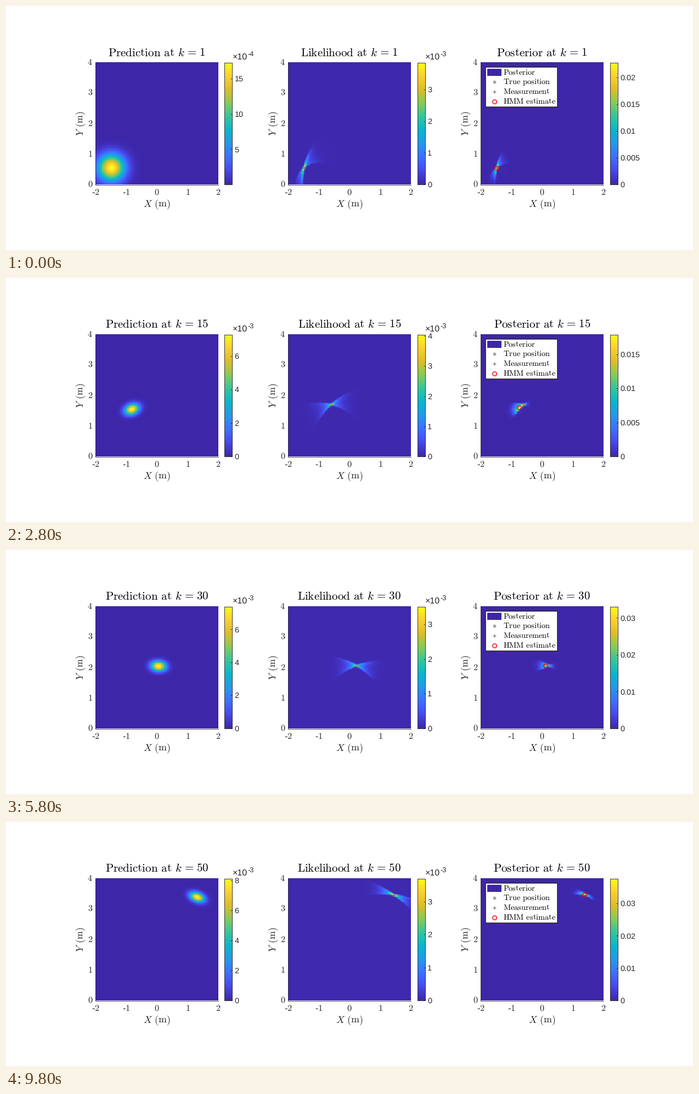
Write a matplotlib script that moves like this. It is 1252 px wide and 447 px high and loops after 10 s.

```python
import numpy as np
import matplotlib.pyplot as plt
from matplotlib.animation import FuncAnimation
from matplotlib.colors import LinearSegmentedColormap
from matplotlib.patches import Rectangle

W, H, DPI = 1252, 447, 64
PT = 72 / DPI  # points per pixel
STEPS, INTERVAL = 50, 200
LEFTS, TOP, SIDE = (163, 514, 865), 103.5, 224
BOTTOM = TOP + SIDE
INK = "0.15"

plt.rcParams.update({
    "mathtext.fontset": "cm",
    "text.hinting": "none",
    "toolbar": "None",
})

parula = LinearSegmentedColormap.from_list("parula", [
    "#3e26a8", "#4747eb", "#3e6fff", "#2797eb", "#08b5d0",
    "#31c69f", "#81cc59", "#dcbd29", "#fccf30", "#f9fb15"])

# Tracking model, in metres
CELLS = 133
START_SIGMA, STEP_SIGMA, FAN_SIGMA = .3, .095, .26
RIDGE, REACH, FLOOR = .02, .38, .011
sensors = np.sin(np.linspace(-1.2, 1.2, 17)) / np.sin(1.2)
centres = (np.arange(CELLS) + .5) * 4 / CELLS
gx, gy = np.meshgrid(centres - 2, centres)
speckle = np.random.default_rng(4).uniform(.8, 1.1, gx.shape)


def true_position(step):
    u = step / (STEPS - 1)
    wave = np.sin(2 * np.pi * u)
    x = -1.48 + 2.92 * u + .06 * wave * (1 - .6 * u)
    y = .55 + 2.91 * u + .3 * wave - .055 * np.sin(4 * np.pi * u)
    return np.array([x, y])


def normalised(field):
    return field / field.sum()


def gaussian(mean, cov):
    u, v = gx - mean[0], gy - mean[1]
    (a, b), (_, c) = np.linalg.inv(cov)
    return normalised(np.exp(-.5 * (a * u * u + 2 * b * u * v + c * v * v)))


def range_fan(p):
    """Range arcs of all sensors crossing at one point."""
    fan = np.mean([np.exp(-.5 * ((np.hypot(gx - s, gy) - np.hypot(p[0] - s, p[1]))
                                 / RIDGE)**2) for s in sensors], axis=0)
    window = np.exp(-((gx - p[0])**2 + (gy - p[1])**2) / (2 * REACH**2))
    return normalised(fan**.9 * window * speckle + FLOOR)


def fan_covariance(p):
    away = np.column_stack([p[0] - sensors, np.full(len(sensors), p[1])])
    away /= np.linalg.norm(away, axis=1)[:, None]
    tangents = away[:, ::-1] * (-1, 1)
    return FAN_SIGMA**2 * tangents.T @ tangents / len(sensors) + 1e-4 * np.eye(2)


def track():
    """Random-walk filter: true position, prediction and estimate at each step."""
    mean, cov = true_position(0), START_SIGMA**2 * np.eye(2)
    history = []
    for step in range(STEPS):
        truth = true_position(step)
        gain = cov @ np.linalg.inv(cov + fan_covariance(truth))
        estimate = mean + gain @ (truth - mean)
        history.append((truth, mean, cov, estimate))
        mean = estimate
        cov = (np.eye(2) - gain) @ cov + STEP_SIGMA**2 * np.eye(2)
    return history


def tex(words):
    return r"\hspace{0.38}".join(r"\mathrm{%s}" % w for w in words.split())


def to_pixels(left, point):
    return left + (point[0] + 2) * SIDE / 4, BOTTOM - point[1] * SIDE / 4


fig = plt.figure(figsize=(W / DPI, H / DPI), dpi=DPI, facecolor="white")
ax = fig.add_axes([0, 0, 1, 1])
ax.set(xlim=(0, W), ylim=(H, 0))
ax.axis("off")
ax.autoscale(False)


def text(x, y, s, size, ha="center", color=INK, **kw):
    return ax.text(x, y, s, fontsize=size * PT, ha=ha, va="baseline", color=color, **kw)


def picture(data, left, right, top, bottom):
    return ax.imshow(data, cmap=parula, vmin=0, vmax=1, origin="lower", aspect="auto",
                     interpolation="nearest", extent=(left, right, bottom, top))


def marker(x, y, shape, size, color, width=1., zorder=4, **kw):
    return ax.plot([x], [y], shape, ms=size * PT, mec=color, mew=width * PT,
                   zorder=zorder, **kw)[0]


def frame_panel(left):
    ax.plot([left, left, left + SIDE], [TOP, BOTTOM, BOTTOM], color=INK, lw=.8 * PT)
    for i in range(5):
        text(left - 5, BOTTOM - i * SIDE / 4 + 4, rf"$\mathrm{{{i}}}$", 16.2, "right")
        x = left + i * SIDE / 4
        value = i - 2
        if value < 0:
            text(x - 4, 346.5, "-", 16.2, family="Liberation Serif")
        text(x + (2.7 if value < 0 else 0), 346.5, rf"$\mathrm{{{abs(value)}}}$", 16.2)
    text(left + SIDE / 2, 367.5, rf"$X\hspace{{0.38}}{tex('(m)')}$", 18)
    text(left - 22.5, 215.5, rf"$Y\hspace{{0.38}}{tex('(m)')}$", 18,
         rotation=90, rotation_mode="anchor")


class ColourBar:
    def __init__(self, left, exponent):
        self.left = left
        picture(np.linspace(0, 1, 256)[:, None], left, left + 14, TOP + .5, BOTTOM - .5)
        ax.add_patch(Rectangle((left, TOP + .5), 14, SIDE - 1, fill=False,
                               ec=INK, lw=.9 * PT, zorder=3))
        self.ticks = ax.plot([], [], "_", ms=3 * PT, mec=INK, mew=.8 * PT, zorder=3)[0]
        self.labels = [text(left + 18.7, 0, "", 14.4, "left", family="Liberation Sans")
                       for _ in range(9)]
        self.power = None
        if exponent:
            text(left + 14.5, 98, "×10", 16, "left", family="Liberation Sans")
            self.power = text(left + 42, 91.5, "", 12.8, "left", family="Liberation Sans")

    def show(self, peak, step, power="", with_zero=True):
        values = [i * step for i in range(9)
                  if i * step <= peak and (i or with_zero)]
        heights = [BOTTOM - .5 - v / peak * (SIDE - 1) for v in values]
        for label in self.labels:
            label.set_text("")
        for label, v, y in zip(self.labels, values, heights):
            label.set_text(f"{v:g}")
            label.set_y(y + 5)
        self.ticks.set_data([self.left + 12.3] * len(values), heights)
        if self.power:
            self.power.set_text(power)


def draw_legend():
    ax.add_patch(Rectangle((873.5, 111.5), 131, 73, fc="white", ec=INK,
                           lw=1.5 * PT, zorder=6))
    ax.add_patch(Rectangle((876.5, 115), 26.5, 12.5, fc=parula(0), lw=0, zorder=7))
    marker(890, 139, "o", 5, "0.65", zorder=7, mfc="0.65")
    marker(890, 156.5, "+", 6, "0.45", 1.3, zorder=7)
    marker(890, 174.5, "o", 7.5, "red", 1.4, zorder=7, mfc="none")
    for i, name in enumerate(("Posterior", "True position", "Measurement", "HMM estimate")):
        text(906, 126 + 17.6 * i, f"${tex(name)}$", 14.4, "left", "black", zorder=7)


names = ("Prediction", "Likelihood", "Posterior")
blank = np.zeros((CELLS, CELLS))
images = [picture(blank, x, x + SIDE, TOP, BOTTOM) for x in LEFTS]
for x in LEFTS:
    frame_panel(x)
titles = [text(x + SIDE / 2, 91.5, "", 21, color="black") for x in LEFTS]
bars = [ColourBar(398, True), ColourBar(749.5, True), ColourBar(1101, False)]
dots = [marker(0, 0, "o", 3.5, "0.65", .5, mfc="0.65") for _ in LEFTS[1:]]
pluses = [marker(0, 0, "+", 5.5, "0.45", 1) for _ in LEFTS[1:]]
ring = marker(0, 0, "o", 7.5, "red", 1.4, zorder=5, mfc="none")
draw_legend()
history = track()


def update(frame):
    truth, mean, cov, estimate = history[frame]
    prediction, likelihood = gaussian(mean, cov), range_fan(truth)
    posterior = normalised(prediction * likelihood)
    fields = prediction, likelihood, posterior
    peaks = [field.max() for field in fields]
    for image, field, peak in zip(images, fields, peaks):
        image.set_data(field / peak)
    for title, name in zip(titles, names):
        title.set_text(rf"${tex(name + ' at')}\hspace{{0.38}}k"
                       rf"\hspace{{0.117}}=\hspace{{0.117}}{frame + 1}$")

    if peaks[0] < .002:
        bars[0].show(peaks[0] * 1e4, 5, "-4", with_zero=False)
    else:
        bars[0].show(peaks[0] * 1e3, 2, "-3")
    bars[1].show(peaks[1] * 1e3, 1, "-3")
    bars[2].show(peaks[2], .005 if peaks[2] < .033 else .01)

    for left, dot, plus in zip(LEFTS[1:], dots, pluses):
        x, y = to_pixels(left, truth)
        dot.set_data([x], [y])
        plus.set_data([x], [y])
    x, y = to_pixels(LEFTS[2], estimate)
    ring.set_data([x], [y])
    return []


anim = FuncAnimation(fig, update, frames=STEPS, interval=INTERVAL,
                     init_func=lambda: [], repeat=True, repeat_delay=0, blit=False)
plt.show()
```
